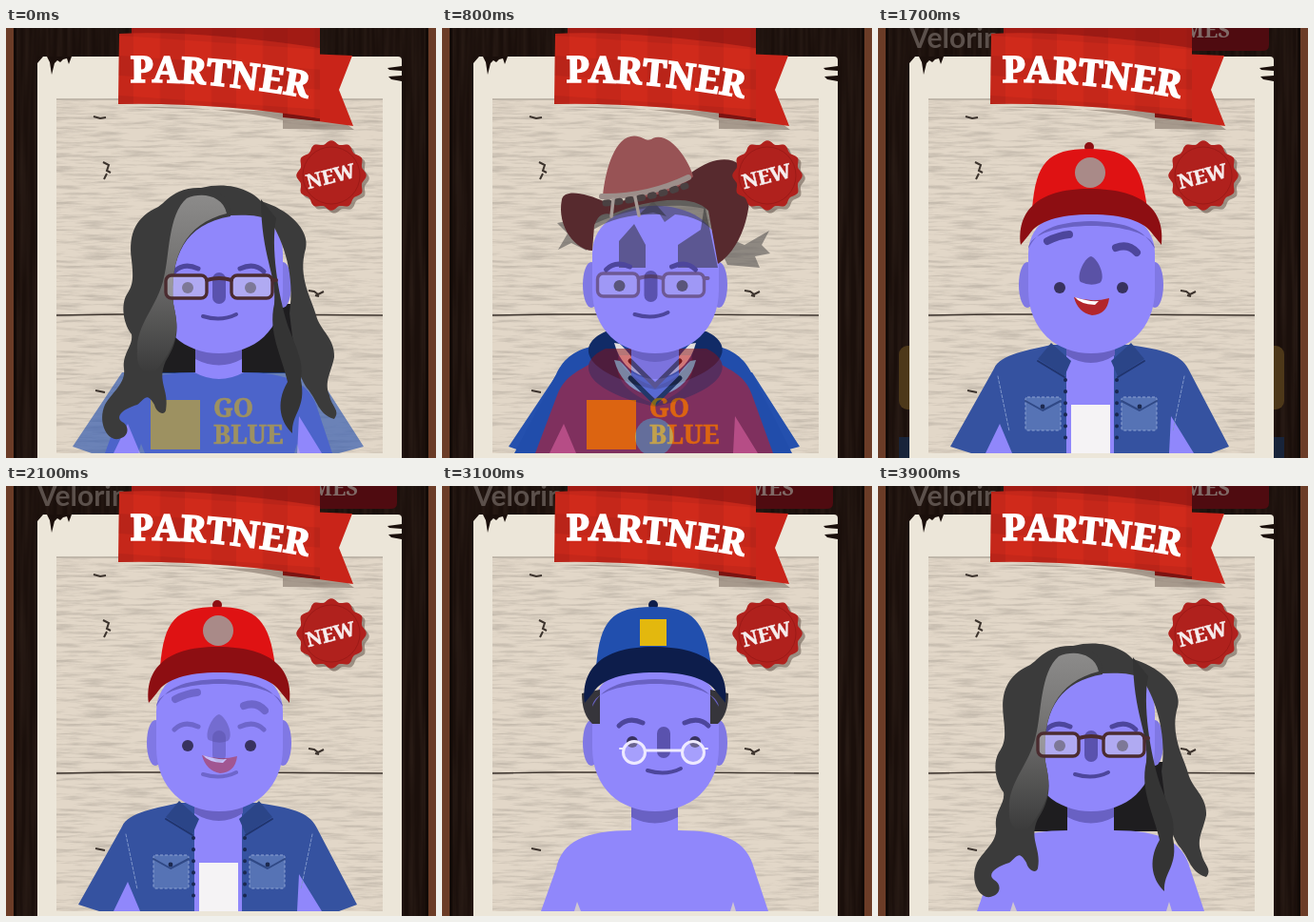
Recreate the animation shown at these times as an HTML page. Size 452 by 452 pixels, loop 4000 ms.

```html
<!DOCTYPE html>
<html lang="en">
<head>
<meta charset="utf-8">
<title>Partner card</title>
<style>
html, body { margin: 0; width: 100%; height: 100%; overflow: hidden; background: #1a0f0b; }
svg { display: block; width: 100vw; height: 100vh; }
.slab { font-family: "Noto Serif", serif; font-weight: 800; }
</style>
</head>
<body>
<svg viewBox="0 0 452 452">
<defs>
  <filter id="grain" x="0" y="0" width="1" height="1">
    <feTurbulence type="fractalNoise" baseFrequency=".025 .3" numOctaves="4" seed="8"/>
    <feColorMatrix values="0 0 0 0 .45  0 0 0 0 .4  0 0 0 0 .34  2.6 0 0 0 -1.1"/>
  </filter>
  <filter id="planks" x="0" y="0" width="1" height="1">
    <feTurbulence type="fractalNoise" baseFrequency=".2 .008" numOctaves="2" seed="3"/>
    <feColorMatrix values="0 0 0 0 .2  0 0 0 0 .12  0 0 0 0 .08  1.4 0 0 0 -.45"/>
  </filter>
  <pattern id="plaid" width="54" height="42" patternUnits="userSpaceOnUse" patternTransform="translate(134 9) skewY(4)">
    <path d="M28 0H54V42H28Z M0 21H54V42H0Z" fill="#7d1010" opacity=".13"/>
    <path d="M28 21H54V42H28Z" fill="#7d1010" opacity=".16"/>
  </pattern>
  <linearGradient id="lockFill" x1="0" y1="0" x2="0" y2="1">
    <stop stop-color="#8c8b8a"/><stop offset=".35" stop-color="#777675"/><stop offset="1" stop-color="#3b3b3b"/>
  </linearGradient>
  <clipPath id="photo"><path d="M53 74H396V447H53Z"/></clipPath>
  <path id="arc" d="M131 57Q222 55 334 77"/>
</defs>

<rect width="452" height="452" fill="#1a0f0b"/>
<rect width="452" height="452" filter="url(#planks)" opacity=".2"/>
<path d="M0 0H8V452H0Z M444 0H452V452H444Z" fill="#6b3c27"/>
<path d="M8 0h3v452h-3z M441 0h3v452h-3z" fill="#120a07"/>

<g id="panels">
  <rect x="22" y="334" width="405" height="67" rx="9" fill="#4d3819"/>
  <path d="M22 430h405v22h-405z" fill="#18243a"/>
</g>
<g id="lobby">
  <text x="33" y="21" font-family="Lato, sans-serif" font-weight="700" font-size="30" fill="#5b504b">Velorin</text>
  <path d="M320 0H411V18Q411 24 404 24H320Z" fill="#4f0b10"/>
  <text class="slab" x="322" y="10" font-size="22" fill="#806966">MES</text>
</g>

<rect x="33" y="30" width="383" height="430" rx="4" fill="#ece6d9"/>
<path d="M43 30L46 36L48 49L51 37L54 34L57 36L60 33L64 32L66 38L69 30Z M416 40L401 42L403 44L416 45Z M416 50L402 51L405 54L416 56Z M33 30h6l-6 7z" fill="#1a0f0b"/>
<rect x="53" y="74" width="343" height="373" fill="#e2d7c8"/>
<rect x="53" y="74" width="343" height="373" filter="url(#grain)" opacity=".6"/>
<g fill="none" stroke="#3c332d">
  <path d="M53 302L118 301L230 301L396 302" stroke-width="1.4"/>
  <path d="M53 75H396" stroke="#b5aca0" stroke-width="1.5"/>
  <path d="M92 93l7 2 6-1 M102 141l6 3-2 6 4 2 M106 153l-3 6 M318 276l6 1 4 3 6-3 M325 281l4 1 M94 381l10 2" stroke-width="2"/>
</g>

<g id="stage" clip-path="url(#photo)"></g>

<path d="M122 83Q220 81 291 97L291 106L366 107L350 95L300 88Z" fill="#392a22" opacity=".35"/>
<path d="M132 0H330V21L132 8Z" fill="#a81d15"/>
<path d="M132 0H330V21L132 8Z" fill="url(#plaid)"/>
<path d="M291 26L364 29L350 65L365 103L291 93Z" fill="#c92419"/>
<path d="M291 88L330 95V98L291 94Z" fill="#7c1311"/>
<path d="M119 6Q200 2 330 21V95Q220 78 118 80Z" fill="#d02a1b"/>
<path d="M119 6Q200 2 330 21V95Q220 78 118 80Z" fill="url(#plaid)"/>
<text class="slab" font-size="38" letter-spacing=".6" fill="#fff" stroke="#fff" stroke-width="1.6"><textPath href="#arc">PARTNER</textPath></text>

<path id="sealShade" fill="#4a3a32" opacity=".45" transform="translate(3 3)"/>
<path id="seal" fill="#b0211d"/>
<circle cx="342" cy="155" r="30" fill="none" stroke="#9c1a17" stroke-width="1"/>
<text class="slab" x="341" y="163" font-size="21" fill="#f6eeee" stroke="#f6eeee" stroke-width=".5" text-anchor="middle" transform="rotate(-14 342 155)">NEW</text>
</svg>

<script>
const $ = id => document.getElementById(id);
const LOOP = 4000, STEP = 100;
const SKIN = '#9087fb', SHADE = '#6961c3', INK = '#4d469c', HAIR = '#3b3b3b';

const path = (d, fill, more = '') => `<path d="${d}" fill="${fill}" ${more}/>`;
const line = (d, color, w, more = '') =>
  `<path d="${d}" fill="none" stroke="${color}" stroke-width="${w}" stroke-linecap="round" stroke-linejoin="round" ${more}/>`;
const dot = (x, y, r, fill, more = '') => `<circle cx="${x}" cy="${y}" r="${r}" fill="${fill}" ${more}/>`;
const box = (x, y, w, h, r, fill, more = '') =>
  `<rect x="${x}" y="${y}" width="${w}" height="${h}" rx="${r}" fill="${fill}" ${more}/>`;
const layer = (id, body) => `<g id="${id}">${body}</g>`;
const mirror = s => s + `<g transform="matrix(-1 0 0 1 448 0)">${s}</g>`;

const arms = path('M113 447L128 416L141 447Z M306 447L308 408L332 447Z', SKIN);
const jacket = 'M76 440L122 358C128 343 160 338 182 333H264C300 338 318 343 326 358L369 440L350 447H98Z';

const body =
  path('M104 447L120 402C126 374 150 362 200 362H248C298 362 321 374 328 402L343 447Z', SKIN) +
  path('M139 447L142 437L146 447Z M303 447L306 437L309 447Z', '#cfc6d2') +
  box(199, 325, 49, 50, 0, SKIN) + path('M199 325H248V348Q224 361 199 348Z', SHADE);

const tee =
  path('M70 440L122 362L198 362Q224 376 250 362L326 362L376 440L350 447H90Z', '#2450ae') + arms;
const teePrint =
  box(152, 391, 52, 52, 0, '#deb50f') +
  '<g class="slab" font-size="27" fill="#deb50f" stroke="#deb50f" stroke-width=".6"><text x="218" y="409">GO</text><text x="218" y="437">BLUE</text></g>';

const hood = (main, dark) =>
  path('M172 319C138 334 150 364 224 380C298 364 310 334 278 319Z', dark) +
  path('M186 326C178 350 196 368 224 377C252 368 270 350 262 326Z', main) +
  mirror(path('M181 331C186 350 198 362 212 366C204 352 196 340 187 332Z', '#e3dedd')) +
  path('M199 316H249V350L224 372L199 350Z', SKIN) + path('M199 318H249V344Q224 358 199 344Z', SHADE) +
  line('M198 350L224 376L250 350', '#23222a', 5);

const blueHood = path('M76 447L120 364C128 346 142 338 160 334H288C304 338 318 346 326 364L368 447Z', '#214dab') +
  arms + hood('#1a3f92', '#112b67');

const redHood = path('M98 447L121 386C128 368 140 362 154 354H294C308 362 320 368 326 386L348 447Z', '#dc1513') +
  `<g transform="translate(0 18)">${hood('#c21214', '#8b1014')}</g>` + dot(223, 430, 20, '#a78f8c');

const pocket = box(155, 388, 37, 35, 2, '#5673b5', 'stroke="#8ea3d2" stroke-dasharray="3 2"') +
  line('M155 392L173 402L192 392', '#304986', 2) + dot(173, 398, 2.4, '#1d2a50');
const denim = path(jacket, '#3552a0') + arms +
  path('M198 340H248V447H198Z', SKIN) + path('M203 396H244V447H203Z', '#f5f3f5') +
  path('M198 333H249V344Q224 360 198 344Z', SHADE) +
  mirror(path('M168 348L182 331L203 350L196 366Z', '#2b4588') + line('M168 350L196 367', '#20346d', 2) +
    line('M126 366L138 424', '#7f96ca', 1, 'stroke-dasharray="3 2"') +
    line('M197 370V440', '#192750', 4, 'stroke-dasharray=".1 12"') + pocket);

const leather = path(jacket, '#1f1f20') +
  path('M122 358C128 343 160 338 182 333H264C300 338 318 343 326 358L340 385C318 408 280 412 252 408H196C165 412 120 408 106 386Z', '#3b3b3c') +
  path('M116 447L125 431L133 447Z', SKIN) +
  path('M199 345H248V447H199Z', '#f0d078') + path('M199 330H249V346Q224 354 199 346Z', SHADE) +
  line('M198 362V447 M249 350V447', '#d9d5cf', 5) + line('M195 362V447 M252 350V447', '#77716d', 1.4) +
  path('M180 344Q192 336 203 345Q215 335 224 346L216 359Q205 354 195 358Z', '#303033') + dot(212, 346, 4, '#c8c4c2');

const head =
  mirror('<ellipse cx="157" cy="270" rx="9" ry="24" fill="#8078e4"/>') +
  path('M158 237C158 170 291 170 291 237V275C291 318 260 342 224 342C188 342 158 318 158 275Z', SKIN);

const calm = mirror(line('M177 256Q187 246 202 253', INK, 5)) +
  line('M207 303Q226 309 242 301', INK, 4) + box(217, 257, 14, 33, 7, '#5a52ae');
const cheer = line('M178 224Q190 218 201 217', INK, 8) + line('M250 231Q263 226 272 236', INK, 8) +
  path('M224 240C232 243 240 263 233 268Q224 272 213 267C208 262 216 242 224 240Z', '#5a52a6') +
  path('M206 283Q225 289 243 284Q241 301 225 302Q210 299 206 283Z', '#b3262b') +
  path('M207 283Q222 288 232 287L228 291Q212 290 207 283Z', '#fff');
const eyes = mirror(dot(191, 273, 6, '#38325f'));

const squareSpecs = mirror(box(168, 260, 43, 24, 6, '#dcd8e4', 'fill-opacity=".42" stroke="#4b2c30" stroke-width="3.4"')) +
  line('M211 265Q224 261 237 265 M280 265H284', '#4b2c30', 4);
const roundSpecs = mirror(dot(193, 284, 11.5, '#dcd8ff', 'fill-opacity=".3" stroke="#eeeaff" stroke-width="3"') +
  line('M178 280H182', '#eeeaff', 2)) + line('M205 282H243', '#eeeaff', 3);

const longHair =
  path('M205 168C236 160 260 172 268 182C296 190 320 212 315 232C306 262 322 286 326 302C330 318 346 326 345 346C342 362 334 372 340 386C342 398 352 402 345 411C328 406 328 392 316 378C304 360 302 330 298 300C304 260 292 225 278 203C262 192 230 200 205 196Z', HAIR) +
  path('M268 180C268 240 285 260 282 290C275 320 290 345 296 372C282 396 290 416 301 426C300 405 316 400 310 370C314 350 302 330 296 312C286 280 278 230 284 200Z', '#343434') +
  path('M236 196C236 166 200 164 182 172C172 176 166 184 160 188C138 198 128 214 132 244C134 262 134 270 127 280C120 292 124 312 132 322C134 334 122 342 124 358C126 374 112 382 104 396C96 414 106 434 118 432C130 430 130 418 122 414C114 408 124 400 138 396C146 390 148 382 156 396C158 404 166 408 168 402C172 380 158 372 168 350C184 325 180 310 176 290C172 240 188 206 236 198Z', HAIR) +
  path('M232 195C228 176 206 172 190 179C170 196 172 240 166 262C160 292 136 312 138 340C136 360 152 372 164 352C184 325 180 310 176 290C172 240 188 206 232 195Z', 'url(#lockFill)');

const tufts =
  path('M162 200C190 172 250 172 286 184L290 194C250 180 200 188 160 206Z', '#3a3a3c') +
  path('M284 214L318 228L344 213L336 228L345 237L329 240L334 252L300 249Z M121 205L146 200L152 234L136 226L122 233L132 216Z', '#3c3b3d') +
  path('M186 252V224L202 206L214 228V252Z M248 252V228L272 212L276 186L290 252Z M206 197L222 182L236 198L222 194Z', '#29292b');
const lock =
  path('M174 192C172 230 174 252 152 262C130 274 122 292 130 306C142 316 134 328 146 338C166 330 170 310 162 292C166 270 188 260 192 235C198 215 196 200 188 190Z', 'url(#lockFill)') +
  path('M147 318C134 330 116 328 115 342C116 352 130 350 125 362C122 370 116 372 110 375C114 384 134 382 139 368C142 356 129 352 132 343C140 336 152 344 156 330Z', '#303031');

const cropped = path('M163 196C195 172 250 172 284 182L289 218C280 205 262 197 245 196L234 204L229 196C200 195 178 200 159 212Z', '#343437');
const brim = path('M126 180C120 210 142 234 158 234L160 208C164 196 170 194 178 196C210 182 262 172 280 192L290 248C320 228 327 180 322 158C316 136 292 130 262 152C240 172 205 180 174 184C148 172 129 170 126 180Z', '#572a2e');
const crown = path('M169 177C172 150 182 119 202 119C212 119 214 126 222 121C242 115 261 146 264 158C238 178 200 182 169 177Z', '#985355');
const cord = line('M168 177Q215 178 259 157', '#9c8e8a', 6) +
  line('M172 184Q215 180 256 166', '#4a4142', 7, 'stroke-dasharray="3 9"') +
  line('M180 180L178 198 M203 178L207 197', '#a79b97', 3.5);

const cap = (main, dark, mark) => dot(222, 125, 5, dark) +
  path('M158 232C160 200 288 200 291 232C280 212 262 204 224 203C186 204 168 212 158 232Z', SHADE) +
  path('M162 190C166 142 178 127 222 127C264 127 277 142 283 190Z', main) +
  path('M150 228C146 195 165 169 222 169C283 169 302 195 298 228L289 217C280 203 258 196 224 196C190 196 168 203 159 217Z', dark) + mark;
const redCap = cap('#df1213', '#8d0e12', dot(223, 152, 16, '#a98a88'));
const blueCap = mirror(path('M147 218L166 214V250H158Q147 240 147 218Z', '#36353b')) +
  cap('#214fae', '#0d1d4b', box(208, 140, 28, 28, 0, '#e3b80e'));

$('stage').innerHTML =
  layer('back', path('M160 290H312V363H160Z', '#1e1d1f')) + body +
  layer('tee', tee) + layer('blueHood', blueHood) + layer('print', teePrint) +
  layer('redHood', redHood) + layer('denim', denim) + layer('leather', leather) + head +
  layer('cropped', cropped) + layer('tufts', tufts) +
  layer('face', eyes + layer('calm', calm) + layer('cheer', cheer)) +
  layer('specs', layer('squareSpecs', squareSpecs) + layer('roundSpecs', roundSpecs)) +
  layer('redCap', redCap) + layer('blueCap', blueCap) +
  layer('cowboy', brim + layer('crown', crown) + cord) +
  layer('longHair', longHair) + layer('lock', lock);
$('stage').insertBefore($('specs'), null);
$('stage').insertBefore($('cowboy'), null);

let seal = '';
for (let i = 0; i <= 144; i++) {
  const a = i / 144 * Math.PI * 2, r = 35 + 1.8 * Math.cos(a * 12);
  seal += (i ? 'L' : 'M') + (342 + r * Math.cos(a)).toFixed(1) + ' ' + (155 + r * Math.sin(a)).toFixed(1);
}
for (const id of ['seal', 'sealShade']) $(id).setAttribute('d', seal);

// fade in from, fade in until, fade out from, fade out until
const spans = {
  back: [3500, 3700, 4300, 4500], longHair: [3500, 3700, 4300, 4500],
  tee: [3900, 4060, 4800, 4900], print: [3900, 4080, 4800, 4900],
  blueHood: [300, 500, 800, 900], redHood: [700, 900, 1500, 1600],
  denim: [1400, 1600, 2200, 2300], leather: [2100, 2300, 2700, 2900],
  tufts: [300, 500, 700, 900], lock: [300, 500, 600, 800],
  cropped: [700, 900, 1400, 1600], cowboy: [300, 500, 1400, 1600],
  redCap: [1400, 1600, 2800, 2900], blueCap: [2700, 2900, 3400, 3600],
  squareSpecs: [3600, 3800, 4700, 4900], roundSpecs: [2300, 2500, 3400, 3600],
  calm: [2000, 2200, 5400, 5600], cheer: [1400, 1600, 2000, 2200],
  lobby: [1500, 1700, 3950, 4000], panels: [1500, 1700, 1700, 1800]
};
const clamp = v => Math.max(0, Math.min(1, v));
const alpha = (t, [a, b, c, d]) => {
  const u = (t - a + LOOP) % LOOP;
  return Math.min(clamp(u / (b - a)), clamp((d - a - u) / (d - c)));
};
const track = (t, keys) => {
  const i = Math.max(1, keys.findIndex(k => k[0] >= t));
  const [a, x] = keys[i - 1], [b, y] = keys[i];
  return x + (y - x) * clamp((t - a) / (b - a));
};
const slideX = [[0, 0], [300, 0], [500, -9], [700, -9], [900, 0], [2700, 0], [2900, 9], [3400, 9], [3600, 0], [4000, 0]];
const slideY = [[0, 0], [300, 0], [500, -4], [700, -4], [900, 0], [2700, 0], [2900, -4], [3400, -4], [3600, 0], [4000, 0]];
const stretch = [[0, 1.28], [600, 1.28], [900, 1], [4000, 1]];

function draw(t) {
  for (const id in spans) {
    const v = alpha(t, spans[id]);
    $(id).style.display = v ? '' : 'none';
    $(id).setAttribute('opacity', v.toFixed(3));
  }
  const move = `translate(${track(t, slideX)} ${track(t, slideY)})`;
  $('face').setAttribute('transform', move);
  $('specs').setAttribute('transform', move);
  $('crown').setAttribute('transform', `translate(0 178) scale(1 ${track(t, stretch)}) translate(0 -178)`);
}

function tick(now) {
  draw(Math.floor(now % LOOP / STEP) * STEP);
  requestAnimationFrame(tick);
}
draw(0);
requestAnimationFrame(tick);
</script>
</body>
</html>
```
